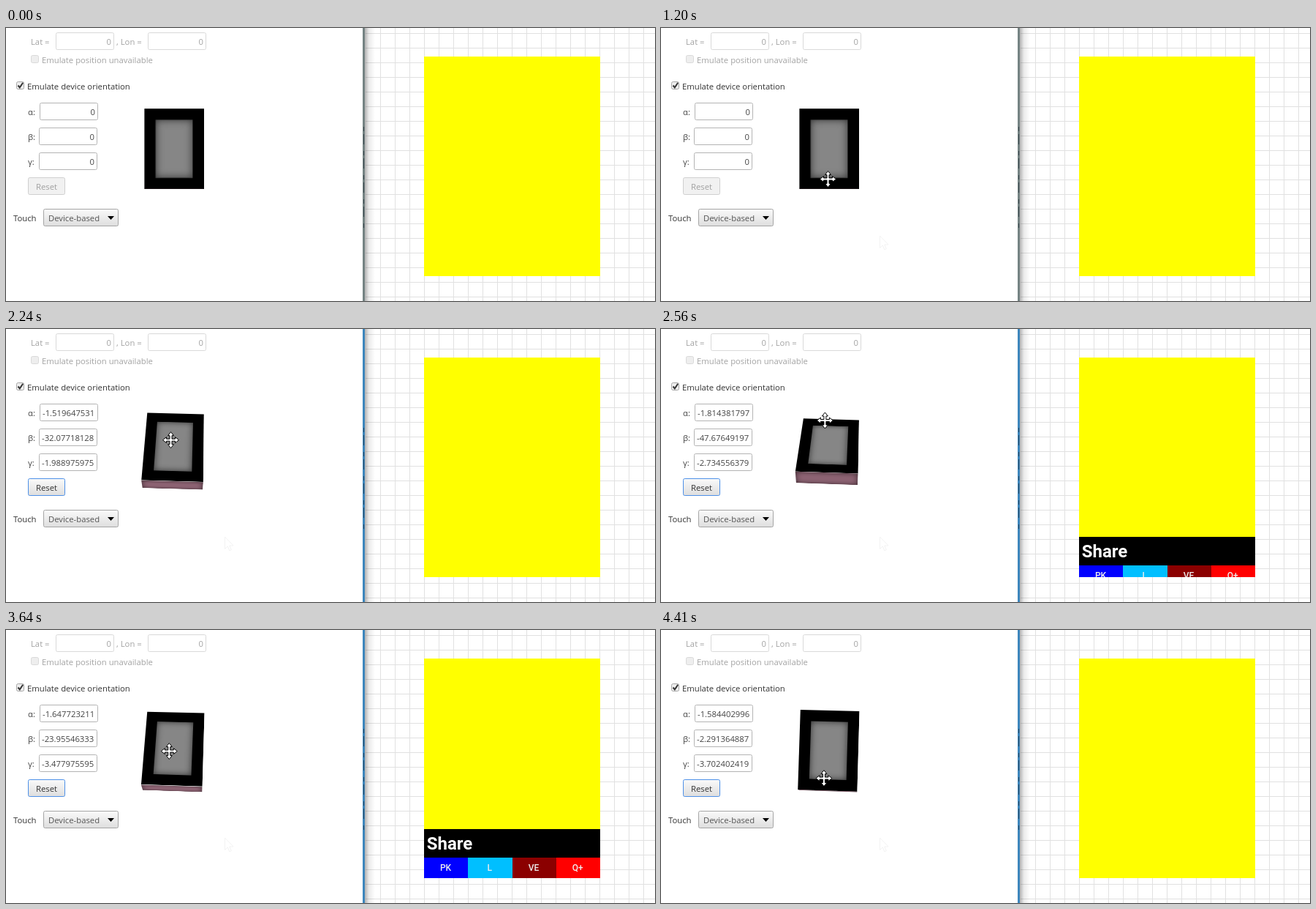
Recreate the animation shown at these times as an HTML page. Size 888 px wide and 373 px high, loop 5090 ms.

```html
<!DOCTYPE html>
<html lang="en">
<head>
<meta charset="utf-8">
<title>Device orientation</title>
<style>
  html, body { margin: 0; width: 100%; height: 100%; overflow: hidden; background: #fff; }
  #stage { position: relative; width: 888px; height: 373px; overflow: hidden; }
  svg { position: absolute; left: 0; top: 0; }
  text { font: 11.3px "Open Sans", "Noto Sans", sans-serif; fill: #333; }
  #fields text { fill: #444; }
  #touch text { fill: #555; }
  .off text { fill: #a3a3a3; }
  .off rect { stroke: #d9d9d9; }
  .field { fill: #fff; stroke: #b4b4b4; }
  .end { text-anchor: end; }
  .mid { text-anchor: middle; }
  #reset rect { fill: #f1f1f1; stroke: #cfcfcf; }
  #reset text { fill: #a0a0a0; }
  .live #reset rect { fill: url(#btn); stroke: #4d90e8; }
  .live #reset text { fill: #333; }
  #bar { fill: #758383; }
  .live #bar { fill: #3d86bd; }
  #page rect, #share rect { shape-rendering: crispEdges; }
  #share .title { font: bold 24px Roboto, "Open Sans", sans-serif; fill: #fff; }
  #share .tag { font: 500 12px Roboto, "Open Sans", sans-serif; fill: #eee; }

  #scene { position: absolute; left: 130px; top: 64.5px; width: 200px; height: 200px; perspective: 660px; }
  #box { position: absolute; left: 60px; top: 46px; width: 80px; height: 108px; transform-style: preserve-3d; }
  #front, #base { position: absolute; left: 0; width: 80px; }
  #front { top: 0; height: 108px; background: #000; transform: translateZ(10px); }
  #front::after {
    content: ""; position: absolute; inset: 15px;
    background: #868686; box-shadow: inset 0 0 10px rgba(0, 0, 0, .65);
  }
  #base {
    top: 97.5px; height: 21px; background: #8d6373; transform: rotateX(-90deg);
    box-shadow: inset 0 0 9px rgba(0, 0, 0, .6);
  }
</style>
</head>
<body>
<div id="stage">
  <svg width="888" height="373">
    <defs>
      <linearGradient id="btn" x2="0" y2="1">
        <stop stop-color="#fafafa"/><stop offset="1" stop-color="#dedede"/>
      </linearGradient>
      <linearGradient id="shade">
        <stop stop-opacity=".3"/><stop offset=".4" stop-opacity=".08"/><stop offset="1" stop-opacity="0"/>
      </linearGradient>
      <clipPath id="view"><rect x="572" y="39" width="241" height="300"/></clipPath>
      <path id="arrow" d="M0 0V16.5L3.8 12.9 6.4 18.8 8.8 17.7 6.3 12H11.6Z"/>
      <path id="cross" d="M0-11L4-6H1.5V-1.5H6V-4L11 0 6 4V1.5H1.5V6H4L0 11-4 6H-1.5V1.5H-6V4L-11 0-6-4V-1.5H-1.5V-6H-4Z"/>
    </defs>

    <g class="off">
      <text x="34" y="23">Lat =</text>
      <rect class="field" x="68.5" y="6.5" width="79" height="23" rx="2"/>
      <text class="end" x="144" y="23">0</text>
      <text x="151" y="23">, Lon =</text>
      <rect class="field" x="194.5" y="6.5" width="79" height="23" rx="2"/>
      <text class="end" x="270" y="23">0</text>
      <rect x="34.5" y="37.5" width="10" height="10" rx="2" fill="#eee"/>
      <text x="49" y="48">Emulate position unavailable</text>
    </g>

    <rect x="14.5" y="73.5" width="10" height="10" rx="2" fill="#eee" stroke="#a6a6a6"/>
    <path d="M16.5 78.5l2.3 2.8 4.4-6.5" fill="none" stroke="#333" stroke-width="2"/>
    <text x="29" y="84">Emulate device orientation</text>

    <g id="fields"></g>

    <g id="reset">
      <rect x="30.5" y="204.5" width="50" height="23" rx="2"/>
      <text class="mid" x="55.5" y="221">Reset</text>
    </g>

    <text x="10" y="264">Touch</text>
    <g id="touch">
      <rect x="51.5" y="247.5" width="102" height="23" rx="2" fill="url(#btn)" stroke="#a5a5a5"/>
      <text x="58" y="264">Device-based</text>
      <path d="M139 257h9l-4.5 5z"/>
    </g>

    <use id="trail" href="#arrow" x="299.5" y="284" fill="none" stroke="#f3f3f3"/>

    <g id="page">
      <path id="grid" fill="none" stroke="#e1e1e1"/>
      <rect x="491" width="14" height="373" fill="url(#shade)"/>
      <rect x="572" y="39" width="241" height="300" fill="#ff0"/>
    </g>
    <rect id="bar" x="488" width="3" height="373"/>
    <path d="M489.5 135V277" stroke="#27343c" stroke-dasharray="6 4 14 9" opacity=".7"/>

    <g clip-path="url(#view)"><g id="share">
      <rect x="572" y="271" width="241" height="39"/>
      <text class="title" x="575.7" y="299.5">Share</text>
    </g></g>
  </svg>

  <div id="scene"><div id="box"><div id="base"></div><div id="front"></div></div></div>

  <svg width="888" height="373">
    <use id="cursor" fill="#fff" stroke="#000"/>
  </svg>
</div>
<script>
const LOOP = 5090, STEP = 40, DRAG = 1370;
const $ = id => document.getElementById(id);

function add(parent, tag, attrs, text = '') {
  const el = document.createElementNS('http://www.w3.org/2000/svg', tag);
  for (const name in attrs) el.setAttribute(name, attrs[name]);
  el.textContent = text;
  return parent.appendChild(el);
}

// Static parts
let lines = '';
for (let x = 512.5; x < 888; x += 20) lines += `M${x} 0V373`;
for (let y = 7.5; y < 373; y += 20) lines += `M492 ${y}H888`;
$('grid').setAttribute('d', lines);

const fields = ['α', 'β', 'γ'].map((name, i) => {
  const x = i ? 45 : 46, y = 102 + i * 34;
  add($('fields'), 'text', { x: 30, y: y + 17 }, name + ':');
  add($('fields'), 'rect', { class: 'field', x: x + .5, y: y + .5, width: 79, height: 23, rx: 2 });
  return { x, el: add($('fields'), 'text', { y: y + 17 }) };
});

Object.entries({ PK: '#00f', L: '#00bfff', VE: '#8b0000', 'Q+': '#f00' }).forEach(([name, fill], i) => {
  const x = 572 + i * 60.25;
  add($('share'), 'rect', { x, y: 310, width: 60.25, height: 30, fill });
  add($('share'), 'text', { class: 'tag mid', x: x + 29.5, y: 328 }, name);
});

// Linear path through points [time, ...values]
function track(points, t) {
  const i = points.findIndex(p => p[0] >= t);
  if (i < 1) return points.at(i).slice(1);
  const [t0, ...from] = points[i - 1], [t1, ...to] = points[i];
  const p = (t - t0) / (t1 - t0);
  return to.map((v, j) => v * p + from[j] * (1 - p));
}

const approach = [[260, 484, 342], [490, 300, 284], [720, 106, 255], [800, 106, 255], [1200, 228, 206]];

// alpha, beta, gamma
const held = [-1.789798059, -45.79993984, -2.625634285];
const turns = [
  [1440, 0, 0, 0],
  [2240, -1.519647531, -32.07718128, -1.988975975],
  [2560, -1.814381797, -47.67649197, -2.734556379],
  [2840, ...held],
  [3240, ...held],
  [3640, -1.647723211, -23.95546333, -3.477975595],
  [4400, -1.584402996, -2.291364887, -3.702402419]
];

// The standard "ease" curve, cubic-bezier(.25, .1, .25, 1)
function ease(x) {
  if (x <= 0) return 0;
  if (x >= 1) return 1;
  const curve = (s, a, b) => 3 * s * (1 - s) ** 2 * a + 3 * s * s * (1 - s) * b + s ** 3;
  let lo = 0, hi = 1;
  for (let i = 0; i < 25; i++) {
    const s = (lo + hi) / 2;
    if (curve(s, .25, .25) < x) lo = s; else hi = s;
  }
  return curve(lo, .1, 1);
}

function draw(t) {
  const angles = track(turns, t);
  const [alpha, beta, gamma] = angles;
  $('stage').classList.toggle('live', t >= DRAG);

  fields.forEach(({ x, el }, i) => {
    const v = angles[i];
    el.textContent = v ? v.toFixed(9).slice(0, 12) : '0';
    el.setAttribute('x', v ? x + 4 : x + 76);
    el.setAttribute('class', v ? '' : 'end');
  });

  $('box').style.transform = `rotateZ(${-alpha}deg) rotateY(${gamma}deg) rotateX(${-beta}deg)`;

  const shown = ease((t - 2305) / 500) - ease((t - 3628) / 500);
  $('share').setAttribute('transform', `translate(0 ${68 * (1 - shown)})`);
  $('share').style.display = shown > 0 ? '' : 'none';

  // While dragging, the pointer and the tilt move together
  const [x, y] = t < DRAG ? track(approach, t) : [228 + gamma * 1.5, 206 + beta / .585];
  const cursor = $('cursor');
  cursor.setAttribute('href', x > 189 && x < 271 && y < 219 ? '#cross' : '#arrow');
  cursor.setAttribute('transform', `translate(${x + .5} ${y + .5})`);
  cursor.style.display = t >= 260 ? '' : 'none';
  $('trail').style.display = t >= 570 ? '' : 'none';
}

const start = performance.now();
function frame() {
  const t = Math.max(0, performance.now() - start) % LOOP;
  draw(Math.floor(t / STEP) * STEP);
  requestAnimationFrame(frame);
}
frame();
</script>
</body>
</html>
```
